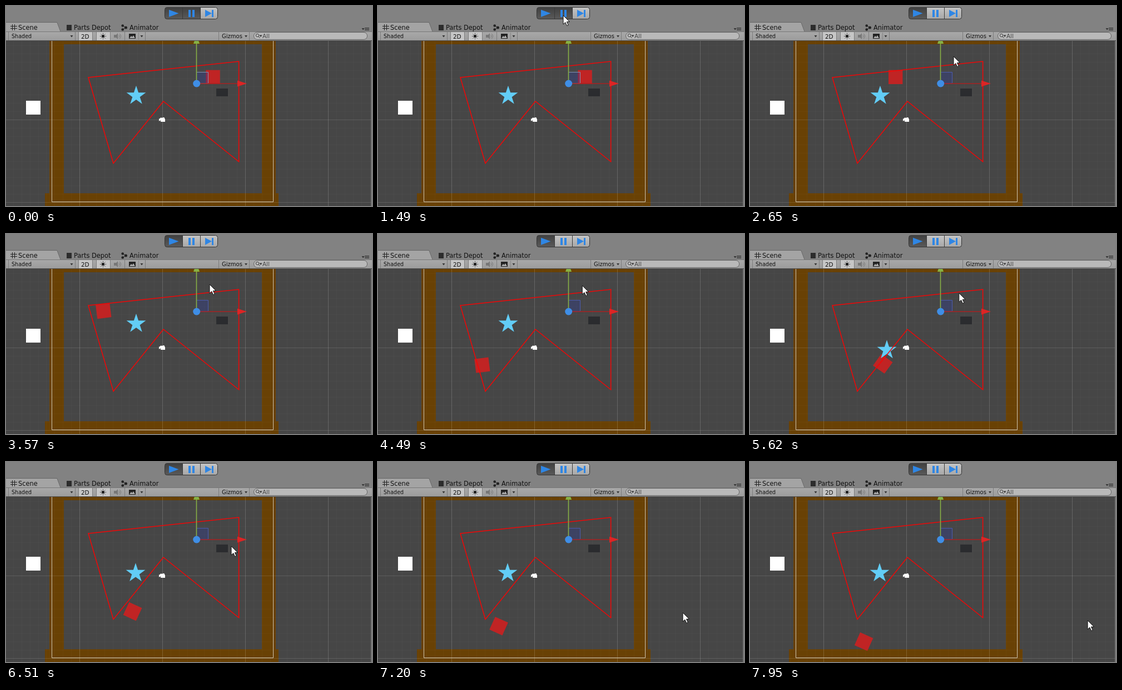
Animation of 658x361 px, one loop 8000 ms. Source, as an HTML page with a canvas:

```html
<!DOCTYPE html>
<html lang="en">
<head>
<meta charset="utf-8">
<title>Scene view</title>
<style>
html, body { margin: 0; width: 100%; height: 100%; overflow: hidden; background: #828282; }
canvas { display: block; }
</style>
</head>
<body>
<canvas id="stage" width="658" height="361"></canvas>
<script>
const ctx = document.getElementById('stage').getContext('2d');
const LOOP = 8000, UNPAUSE = 1620, SPEED = 0.107;

const wall = [[148, 129], [418.6, 100], [418.6, 281], [283, 172], [193, 284]];
const patrol = [[372, 128.3], [174, 128.3], [190, 258], [241.5, 220]];
const arrow = [[0, 0], [0, 16], [3.8, 12.6], [6.6, 18.6], [9.2, 17.5], [6.4, 11.6], [11.3, 11.4]];

const clamp = u => Math.min(1, Math.max(0, u));
const smooth = u => u * u * (3 - 2 * u);
const mix = (a, b, u) => a + (b - a) * u;

// Chains eased moves; each one is { at, end, to } and starts where the last one stopped.
function glide(from, moves, t) {
  return moves.reduce(([x, y], { at, end, to }) => {
    const u = smooth(clamp((t - at) / (end - at)));
    return [mix(x, to[0], u), mix(y, to[1], u)];
  }, from);
}

const cursorMoves = [
  { at: 210, end: 970, to: [249, 15] },
  { at: 1020, end: 1470, to: [333, 17] },
  { at: UNPAUSE, end: 2420, to: [366, 91] },
  { at: 4130, end: 5770, to: [376, 107] },
  { at: 5800, end: 6510, to: [405, 152] },
  { at: 6510, end: 7200, to: [548, 272] },
  { at: 7480, end: 7930, to: [607, 286] }
];
const starMoves = [
  { at: 5000, end: 5600, to: [246, 209.5] },
  { at: 5620, end: 6300, to: [233, 200.5] }
];

// Walks the patrol at constant speed facing ahead, then recoils from the star and drifts off.
function boxPose(t) {
  let left = Math.max(0, t - UNPAUSE) * SPEED, angle = 0;
  for (let i = 1; i < patrol.length; i++) {
    const [x, y] = patrol[i - 1], dx = patrol[i][0] - x, dy = patrol[i][1] - y;
    const length = Math.hypot(dx, dy);
    angle = Math.atan2(dy, dx);
    if (left < length) return [x + dx * left / length, y + dy * left / length, angle];
    left -= length;
  }
  const [x, y] = patrol[patrol.length - 1];
  const since = left / SPEED, u = since / 2665;
  const rest = 24 * Math.PI / 180;
  const turned = rest + (angle + Math.PI / 2 - rest) * Math.exp(-since / 350);
  return [x - 37 * u ** 1.25, y + 104.5 * u ** 0.95, turned];
}

function rect(x, y, w, h, color) {
  ctx.fillStyle = color;
  ctx.fillRect(x, y, w, h);
}

function stroke(color, width = 1) {
  ctx.strokeStyle = color;
  ctx.lineWidth = width;
  ctx.stroke();
}

function frame(x, y, w, h, color) {
  ctx.beginPath();
  ctx.rect(x + 0.5, y + 0.5, w, h);
  stroke(color);
}

function pill(x, y, w, h, r) {
  ctx.beginPath();
  ctx.roundRect(x + 0.5, y + 0.5, w, h, r);
}

function trace(points) {
  ctx.beginPath();
  points.forEach(p => ctx.lineTo(p[0], p[1]));
  ctx.closePath();
}

function poly(points, color) {
  trace(points);
  ctx.fillStyle = color;
  ctx.fill();
}

function disc(x, y, r, color) {
  ctx.beginPath();
  ctx.arc(x, y, r, 0, Math.PI * 2);
  ctx.fillStyle = color;
  ctx.fill();
}

function line(x1, y1, x2, y2, color, width) {
  ctx.beginPath();
  ctx.moveTo(x1, y1);
  ctx.lineTo(x2, y2);
  stroke(color, width);
}

function triangleRight(x, y, w, h, color) {
  poly([[x, y - h / 2], [x + w, y], [x, y + h / 2]], color);
}

function dropMark(x, y) {
  poly([[x - 2.5, y - 1.5], [x + 2.5, y - 1.5], [x, y + 2]], '#333');
}

function label(text, x, y, size, color = '#111') {
  ctx.font = size + 'px "DejaVu Sans", sans-serif';
  ctx.fillStyle = color;
  ctx.fillText(text, x, y);
}

function shade(y1, y2, top, bottom) {
  const g = ctx.createLinearGradient(0, y1, 0, y2);
  g.addColorStop(0, top);
  g.addColorStop(1, bottom);
  return g;
}

function drawGrid() {
  const tone = (i, major) => `rgba(255,255,255,${i % 10 ? 0.025 : major})`;
  for (let i = -18; i <= 26; i++) {
    const x = Math.round(281 + i * 14.9) + 0.5;
    line(x, 63, x, 361, tone(i, 0.17));
  }
  for (let i = -9; i <= 10; i++) {
    const y = Math.round(205 + i * 14.9) + 0.5;
    line(0, y, 656, y, tone(i, 0.12));
  }
}

function drawRoom() {
  rect(0, 63, 658, 298, '#464646');
  rect(78, 63, 407, 298, '#694104');
  rect(70, 338, 420, 23, '#694104');
  rect(104, 69, 356, 269, '#464646');
  drawGrid();
  rect(36, 171, 26, 25, '#fff');
}

function drawStar(x, y) {
  const points = Array.from({ length: 10 }, (_, i) => {
    const r = i % 2 ? 7 : 18.3, a = i * Math.PI / 5;
    return [x + r * Math.sin(a), y - r * Math.cos(a)];
  });
  poly(points, '#62cdf6');
}

function drawBox(x, y, angle) {
  ctx.save();
  ctx.translate(x, y);
  ctx.rotate(angle);
  rect(-12.7, -12.7, 25.4, 25.4, '#c02424');
  ctx.restore();
}

function drawGizmos(paused) {
  frame(82, 56, 398, 297, '#cfc5b4');
  trace(wall);
  stroke('#f50505', 1.5);

  // camera marker
  disc(279, 204, 2.6, '#fff');
  disc(283, 203.5, 2.4, '#fff');
  rect(278, 204, 8, 5, '#fff');
  triangleRight(275, 205.5, 4, 5, '#fff');

  // move handle
  rect(378, 149, 21, 14, '#2b2c2f');
  rect(343, 120, 20, 20, 'rgba(45,60,150,.36)');
  frame(342, 119, 21, 20, paused ? '#8292b4' : '#4c5cae');
  line(342.5, 140, 342.5, 68, '#86b044', 1.6);
  poly([[337, 68], [348, 68], [342.5, 52]], '#86b044');
  line(343, 140, 416, 140, '#a82020', 1.3);
  triangleRight(416, 140, 17, 11, '#dc2525');
  disc(342.7, 140, 6.5, '#3f8ee6');
}

function drawPlayControls(paused) {
  const lit = shade(2, 24, '#c6c6c6', '#a6a6a6');
  const pressed = shade(2, 24, '#404040', '#5a5a5a');
  const blue = '#2f86e4';
  pill(285, 2, 95, 21, 4);
  ctx.save();
  ctx.clip();
  [pressed, paused ? pressed : lit, lit].forEach((fill, i) => {
    rect(286 + i * 32, 2, 32, 22, fill);
    line(317.5 + i * 32, 2, 317.5 + i * 32, 24, '#3a3a3a');
  });
  ctx.restore();
  pill(285, 2, 95, 21, 4);
  stroke('#333');
  triangleRight(293, 13.3, 17.5, 13, blue);
  rect(328, 7, 4, 13, blue);
  rect(335, 7, 4, 13, blue);
  triangleRight(358, 13.3, 12, 13, blue);
  rect(370, 7, 3, 13, blue);
}

function drawTabs() {
  rect(0, 0, 658, 46, '#828282');
  poly([[0, 30], [92, 30], [98, 46], [0, 46]], '#a4a4a4');
  line(0, 29.5, 92, 29.5, '#666');
  line(92, 30, 98, 46, '#6a6a6a');
  for (let i = 0; i < 2; i++) {
    line(11.5 + i * 4, 33, 11.5 + i * 4, 44, '#222');
    line(8, 36.5 + i * 4, 20, 36.5 + i * 4, '#222');
  }
  label('Scene', 22, 43, 11.4);
  rect(109, 34, 9, 10, '#2c2c2c');
  label('Parts Depot', 122, 43, 11.4);
  for (const y of [35.5, 42.5]) {
    disc(209.7, y, 2.3, '#222');
    line(209.7, y, 215.5, 39, '#222');
  }
  disc(215.5, 39, 2.5, '#222');
  label('Animator', 222, 43, 11.4);
  dropMark(642, 41.5);
  for (let i = 0; i < 3; i++) line(645, 39.5 + i * 2, 653, 39.5 + i * 2, '#333');
}

function toolCell(x, w, fill) {
  if (fill) rect(x, 47, w, 15, fill);
  line(x + 0.5, 47, x + 0.5, 62, '#7c7c7c');
  line(x + w + 0.5, 47, x + w + 0.5, 62, '#7c7c7c');
}

function drawToolbar() {
  rect(0, 46, 658, 17, shade(46, 62, '#a9a9a9', '#9c9c9c'));
  line(0, 46.5, 658, 46.5, '#777');
  line(0, 62.5, 658, 62.5, '#4c4c4c');

  toolCell(4, 120);
  label('Shaded', 10, 58, 9.6);
  dropMark(118, 54.5);
  toolCell(130, 25, '#c6c6c6');
  label('2D', 135, 58.5, 10.4);

  // light
  toolCell(162, 25, '#c6c6c6');
  disc(174.5, 54.5, 2.7, '#222');
  for (let i = 0; i < 8; i++) {
    const c = Math.cos(i * Math.PI / 4), s = Math.sin(i * Math.PI / 4);
    line(174.5 + 4 * c, 54.5 + 4 * s, 174.5 + 5.5 * c, 54.5 + 5.5 * s, '#222');
  }

  // speaker
  rect(194, 52, 4, 5, '#777');
  poly([[196, 54.5], [201, 49], [201, 60]], '#777');
  for (const r of [3, 5.5]) {
    ctx.beginPath();
    ctx.arc(201, 54.5, r, -1, 1);
    stroke('#777');
  }

  // picture
  toolCell(213, 37);
  rect(221, 50, 12, 9, '#222');
  poly([[222, 58], [225, 54], [227, 56], [229, 53], [232, 58]], '#b0b0b0');
  line(238.5, 48, 238.5, 61, '#858585');
  dropMark(244, 54.5);

  toolCell(382, 55);
  label('Gizmos', 388, 58, 10);
  dropMark(431.5, 54.5);

  // search
  pill(445, 47, 204, 13, 6.5);
  ctx.fillStyle = '#b9b9b9';
  ctx.fill();
  stroke('#666');
  ctx.beginPath();
  ctx.arc(452, 53, 2.7, 0, Math.PI * 2);
  stroke('#444');
  line(454, 55, 456.5, 58, '#444');
  dropMark(458, 54);
  label('All', 461, 57.5, 10.4, '#444');
}

function drawCursor(x, y) {
  ctx.save();
  ctx.translate(x, y);
  poly(arrow, '#fff');
  stroke('#111');
  ctx.restore();
}

function draw(t) {
  const paused = t < UNPAUSE;
  drawRoom();
  drawBox(...boxPose(t));
  drawStar(...glide([234, 162], starMoves, t));
  drawGizmos(paused);
  rect(656, 63, 2, 298, '#777');
  drawTabs();
  drawToolbar();
  drawPlayControls(paused);
  if (t >= cursorMoves[0].at) drawCursor(...glide([583, 328], cursorMoves, t));
}

const start = performance.now();
function tick() {
  draw((performance.now() - start) % LOOP);
  requestAnimationFrame(tick);
}
tick();
</script>
</body>
</html>
```
